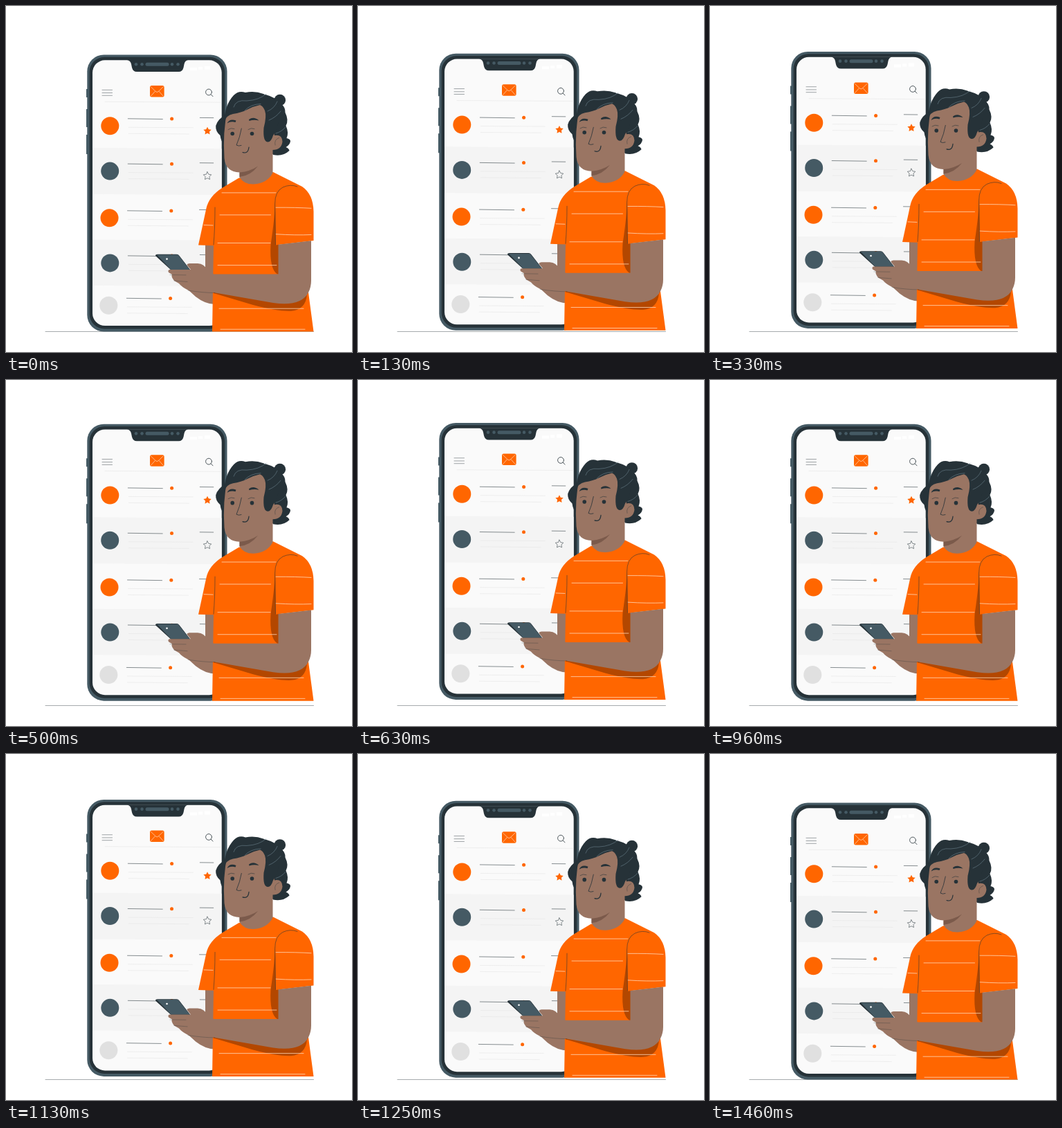
An HTML page that plays this animation: 500 px wide and 500 px high, repeating every 1.5 s.

```html
<!DOCTYPE html>
<html lang="en">
<head>
<meta charset="utf-8">
<title>Mail on the phone</title>
<style>
  html, body { margin: 0; height: 100%; overflow: hidden; background: #fff; }
  svg { display: block; width: 100vw; height: 100vh; }
  .line { fill: none; stroke: #263238; stroke-width: .8; stroke-linecap: round; stroke-linejoin: round; }
  .thin { stroke-width: .55; }
  .pale { stroke: #e4e4e4; }
  .white { stroke: #fff; }
  .stripe { stroke: #ffd9bd; }
  .strand { stroke: #78909c; stroke-width: .5; }
  .orange { fill: #f60; }
  .rust { fill: #b34700; }
  .slate { fill: #455a64; }
  .dark { fill: #263238; }
  .skin { fill: #9a7563; }
</style>
</head>
<body>
<svg viewBox="0 0 500 500">
  <defs>
    <path id="star" d="M0-5.6l1.8 3.5 3.9.6-2.8 2.8.6 3.9L0 3.400l-3.500 1.800.6-3.900-2.800-2.800 3.900-.6z" stroke-linejoin="round"/>
  </defs>
  <path class="line thin" stroke-opacity=".75" d="M57 470.500H444.500"/>
  <g id="scene">
    <!-- Large phone -->
    <path class="slate" d="M116 120h3v12h-3zM116 149h3v26h-3zM116 186h3v28h-3z"/>
    <rect class="slate" x="117.300" y="70.500" width="202.200" height="400" rx="24"/>
    <rect class="dark" x="120.700" y="73.800" width="195.500" height="392.700" rx="21.500"/>
    <rect x="125" y="78.300" width="186.700" height="383.700" rx="18" fill="#fafafa"/>
    <path fill="#f4f4f4" d="M125 205L311.700 206.300V273L125 272zM125 337.500L311.700 338.500V405L125 404z"/>
    <path class="dark" d="M175 78Q180 79 181 84L182 89Q183.500 95 189 95H249.500Q255 95 256.500 89L257.500 84Q258.500 79 263 78z"/>
    <rect class="slate" x="201.500" y="81.700" width="34" height="5" rx="2.500"/>
    <g class="slate">
      <circle cx="188" cy="84.200" r="2.300"/><circle cx="196.500" cy="84.200" r="2.300"/>
      <circle cx="240" cy="84.200" r="2.300"/><circle cx="248.500" cy="84.200" r="2.300"/>
    </g>
    <path fill="#fff" d="M266 89h10v4h-10zM278 88h6v4h-6zM287 87h8v5h-8z"/>
    <path class="line thin" stroke-opacity=".8" d="M139 121.300H153.500M139 125.500H153.500M139 129.300H153.500"/>
    <rect class="orange" x="208" y="115" width="20.600" height="16.500" rx="2.500"/>
    <path class="line thin white" d="M209.500 117L216.500 123.700Q218.300 125.200 220 123.700L227 117M209.500 130L215.300 123.500M227 130L221.300 123.500"/>
    <path class="line" d="M296.200 127.800L299 130.700M297.400 124.500a4.400 4.400 0 1 1-8.800 0a4.400 4.400 0 1 1 8.800 0"/>
    <path class="line thin pale" d="M143 138.300L311 139.200"/>
    <g id="rows"></g>
    <use href="#star" class="orange" x="291" y="180.300"/>
    <use href="#star" class="line thin" x="291" y="245.300"/>

    <!-- Far arm and shirt -->
    <path class="skin" d="M288 344H302V431Q288 431 274 420L262 409L288 400z"/>
    <path class="orange" d="M336.500 248.500L313 262.500Q293 275 289.300 293L278 345.500L300 346.200L298 470.500H444.500L437 414L394 390V345L444.500 339V297Q444 272 428 261L386 240z"/>
    <path class="rust" d="M389 282Q388.500 305 382.500 345Q380.500 380 392 387.500H394V345L389.500 345.500zM300 411Q345 423 400 429Q424 430 435 417Q433 439 412 440.700Q392 441.500 357 432L300 415z"/>
    <path class="line stripe" d="M312 269.900H390M309 301.900H382.500M306 342.500H382M306 374.600H391M308 437.200H430M310 467.200H432M286 316.500L299 317M390 291.200Q420 291 441 292.300M390 329.700Q418 331.500 441 330.500"/>
    <path class="line thin" d="M302 291Q302 320 300 345M389.500 345L388.600 286Q388.500 268 400 262Q411 257 421 261"/>

    <!-- Near arm, hand and small phone -->
    <path class="dark" d="M216 361Q216 358.800 219 358.800H246.500Q249 358.800 250.500 361L266.800 382H239z"/>
    <path class="slate" d="M218 359.600H248.500L265.500 381H238.500z"/>
    <circle cx="232.500" cy="365.600" r="1.300" fill="#fff"/>
    <path class="skin" d="M393.500 344.800V387.500H300Q292 381 285 374.500Q282 372 277 372H265Q260.500 372.500 262 375L267 381H236Q233.500 382 235 385L240 388Q238 390.500 243 397L250 401Q254 406 262 410Q268 414 280 413.500L300 414L386 429Q426 435 437 414Q441 406 441 397V339.300z"/>
    <path class="line thin" stroke-opacity=".55" d="M237 388.500L260 388.800M243 397L262 398.500M263 411Q285 414.500 302 414.500"/>

    <!-- Head -->
    <path class="dark" d="M318 157Q306 163 303.200 173Q302.500 181 309.500 187Q310.500 196 316 201L330 170z"/>
    <path class="dark" d="M375 128Q390 132 397 141Q404 146 403.500 154Q409 165 404.500 173Q409 183 405.500 191Q411 192 411 195.500Q410 201 404.500 204Q409 206 409.500 209Q400 218 386 215L368 190z"/>
    <circle class="dark" cx="395.800" cy="136" r="8.300"/>
    <path class="skin" d="M320 150Q313 182 315.500 220Q317.500 240 337.500 240.500V247.500Q344 258 358 257.500Q378 256 385.500 241V208Q398 208 399.500 196Q399 185 388 187L378 135H340z"/>
    <path fill="#7b5a4b" d="M337.500 240.500Q353 239 364 231.500Q353 245.500 337.500 247z"/>
    <path class="dark" d="M315 168Q316 143 329 129Q336 121.500 346 125Q360 122.500 372 127L386 134Q396 142 395 160Q393 178 386 187Q383 197 378 196.500Q371 196 372.500 176Q377 159 374 151Q371 144 367 143Q357 145 348 150Q340 154 328 156Q318 158 315 168z"/>
    <path class="line strand" d="M329 146Q332 135 348 137Q366 136 376 127M345 151Q353 142 368 141.500M392 138Q388 148 378 152M397 152Q390 161 380 165M404 175Q398 182 390 184"/>
    <path class="dark" d="M319.500 169.500Q323 162 332.500 165.500L331.500 168Q325 166 319.500 169.500zM351 164Q358 159 365.500 165.500Q358 164 351.500 166z"/>
    <circle class="dark" cx="327.200" cy="184.500" r="2.800"/>
    <circle class="dark" cx="355.500" cy="184.500" r="2.800"/>
    <path class="line thin" d="M321 178.500Q325 175.500 330 177.500M350 178.500Q354 175.500 359 177.500"/>
    <path class="line" d="M340.300 177Q338 190 333 201Q336 203 340 201.500"/>
    <path class="line" style="stroke-width:1.200" d="M342 211.500Q350 214 351 204"/>
    <path class="line thin" stroke-opacity=".7" d="M389 201Q387 193 394.500 190.500"/>
  </g>
</svg>
<script>
  const LOOP = 1500, STEPS = 36, LIFT = 10;
  const scene = document.getElementById('scene');

  const mails = [
    [150.3, 173.3, '#f60'], [150.2, 238.6, '#455a64'], [149.5, 306.3, '#f60'],
    [150.3, 371.4, '#455a64'], [148.3, 432.8, '#e0e0e0']
  ];
  document.getElementById('rows').innerHTML = mails.map(([x, y, color]) => `
    <g transform="translate(${x} ${y})">
      <circle r="13" fill="${color}"/>
      <path class="line thin" d="M26-10.500L76-9.800M130-11.900L149.500-11.700"/>
      <circle class="orange" cx="89.300" cy="-10.300" r="2.500"/>
      <path class="line thin pale" d="M27 2L120 2.500M27 11L114 11.700"/>
    </g>`).join('');

  // Linear rise and fall, stepped at 24 per second on a 10 ms clock
  function draw(now) {
    const t = Math.floor(now % LOOP / 10) * 10;
    const step = Math.floor((t + 4) * STEPS / LOOP);
    const phase = Math.min(step / (STEPS - 1), 1);
    const lift = LIFT * (1 - Math.abs(2 * phase - 1));
    scene.setAttribute('transform', `translate(0 ${-lift})`);
  }

  const start = performance.now();
  function tick() {
    draw(performance.now() - start);
    requestAnimationFrame(tick);
  }
  tick();
</script>
</body>
</html>
```
